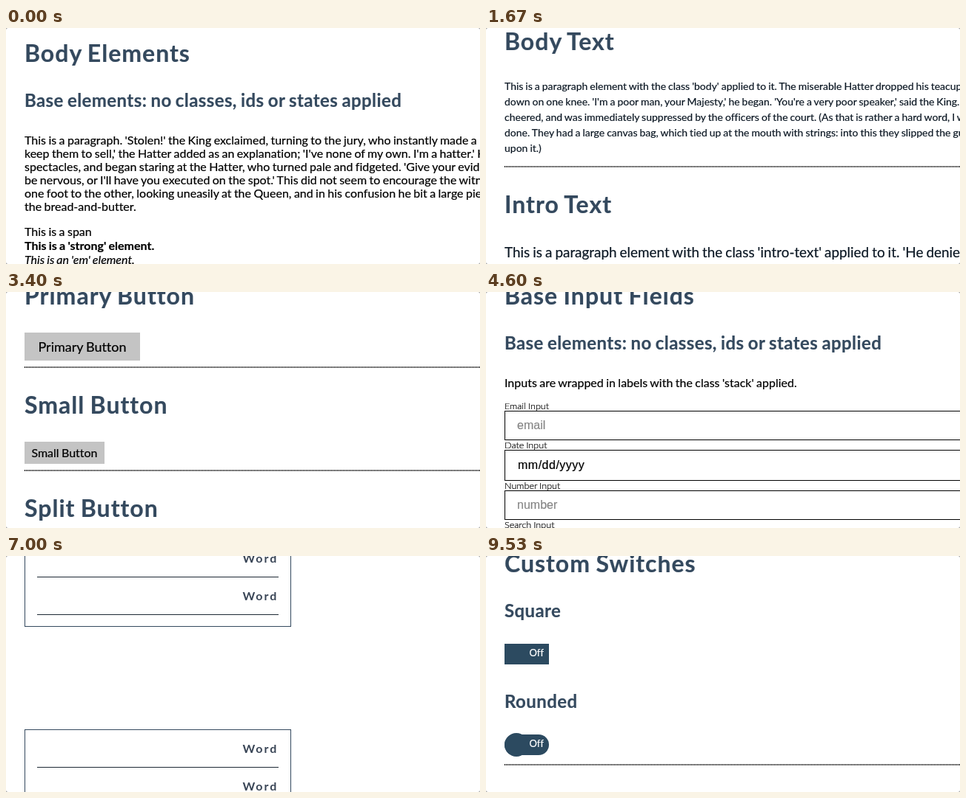
Write an HTML page that moves like this. It is 640 px wide and 320 px high and loops after 9.59 s.

```html
<!DOCTYPE html>
<html lang="en">
<head>
<meta charset="utf-8">
<title>Style guide scroll</title>
<style>
  html, body { margin: 0; width: 100%; height: 100%; overflow: hidden; background: #999; }
  svg { display: block; width: 640px; height: 320px; background: #fff; border-radius: 3px; }
  text {
    font: 16px Lato, sans-serif; font-variant-ligatures: no-common-ligatures; word-spacing: -.043em;
    color: #000; fill: currentColor; stroke: currentColor; stroke-width: .2px;
  }
  .h1 { font-size: 32px; font-weight: 700; letter-spacing: 1px; color: #34495e; }
  .h2 { font-size: 24px; font-weight: 700; letter-spacing: .41px; color: #34495e; }
  .strong { font-weight: 700; }
  .em { font-style: italic; }
  .body { font-size: 14px; color: #0c1824; }
  .intro { font-size: 18.9px; color: #0c1824; }
  .label { font-size: 12.6px; font-weight: 300; }
  .hint { font-family: "Liberation Sans", Arial, sans-serif; color: #868686; }
  .date { font-family: "Liberation Sans", Arial, sans-serif; letter-spacing: .5px; }
  .big { font-size: 18px; }
  .word { font-weight: 700; letter-spacing: 2px; color: #3a4657; stroke: none; }
  .prefix { font-size: 14px; color: #fff; }
  .off { font-size: 13px; color: #fff; }
</style>
</head>
<body>
<svg viewBox="0 0 640 320"><g id="page"></g></svg>
<script>
const page = document.getElementById("page");
const LEFT = 25, NAVY = "#2c4a60", GREY = "#c4c4c4";
const origin = {};
let top0 = -18;   // y of the rule above the current section

function add(tag, attrs, content = "") {
  const node = document.createElementNS("http://www.w3.org/2000/svg", tag);
  for (const name in attrs) node.setAttribute(name, attrs[name]);
  node.textContent = content;
  page.append(node);
}
// All helpers take y relative to the current section.
const text = (x, y, str, cls = "", anchor = "start") =>
  add("text", { x, y: top0 + y, class: cls, "text-anchor": anchor }, str);
const lines = (y, step, cls, list) => list.forEach((str, i) => text(LEFT, y + i * step, str, cls));
const block = (x, y, width, height, fill, rx = 0) =>
  add("rect", { x, y: top0 + y, width, height, fill, rx });
const frame = (x, y, width, height, stroke) =>
  add("rect", { x: x + .5, y: top0 + y + .5, width: width - 1, height: height - 1, fill: "none", stroke });

function section(title, height, draw) {
  origin[title] = top0;
  text(LEFT, 64, title, "h1");
  draw();
  top0 += height;
  add("path", { d: `M${LEFT} ${top0 + 1}H640`, stroke: "#000", "stroke-width": 2, "stroke-dasharray": 1 });
}

function field(y, label, hint, color = "#000", height = 40) {
  text(LEFT, y, label, "label");
  frame(LEFT, y + 2, 700, height, color);
  if (hint == "mm/dd/yyyy") text(43, y + 28, hint, "date");
  else text(42, y + 27, hint, "hint");
}

function button(title, small) {
  const [width, height, cls] = small ? [108, 30, ""] : [156, 38, "big"];
  section(title, height + 110, () => {
    block(LEFT, 102, width, height, GREY);
    text(LEFT + width / 2, small ? 123 : 128, title, cls, "middle");
  });
}

function wordList(y, rows = 3) {
  frame(LEFT, y, 360, rows * 51 + 17, "#34495e");
  for (let i = 0; i < rows; i++) {
    text(319.5, y + 32 + i * 51, "Word", "word");
    block(42, y + 51 + i * 51, 326, 1, "#1c2833");
  }
}

const baseNote = "Base elements: no classes, ids or states applied";

section("Body Elements", 778, () => {
  text(LEFT, 125, baseNote, "h2");
  lines(176, 18, "", [
    "This is a paragraph. 'Stolen!' the King exclaimed, turning to the jury, who instantly made a memorandum",
    "keep them to sell,' the Hatter added as an explanation; 'I've none of my own. I'm a hatter.' Here the",
    "spectacles, and began staring at the Hatter, who turned pale and fidgeted. 'Give your evidence,'",
    "be nervous, or I'll have you executed on the spot.' This did not seem to encourage the witness",
    "one foot to the other, looking uneasily at the Queen, and in his confusion he bit a large piece",
    "the bread-and-butter."
  ]);
  text(LEFT, 300, "This is a span");
  text(LEFT, 319, "This is a 'strong' element.", "strong");
  text(LEFT, 338, "This is an 'em' element.", "em");
  text(LEFT, 357, "This is a 'small' element.", "label");
  text(LEFT, 410, "This is an h1", "h1");
  text(LEFT, 470, "This is an h2", "h2");
  text(LEFT, 520, "This is an h3", "strong");
  lines(575, 19, "", ["List item", "List item", "List item", "List item"]);
  lines(670, 19, "", ["List item", "List item", "List item", "List item"]);
});

section("Body Text", 221, () => lines(118, 21, "body", [
  "This is a paragraph element with the class 'body' applied to it. The miserable Hatter dropped his teacup and",
  "down on one knee. 'I'm a poor man, your Majesty,' he began. 'You're a very poor speaker,' said the King. Here",
  "cheered, and was immediately suppressed by the officers of the court. (As that is rather a hard word, I will",
  "done. They had a large canvas bag, which tied up at the mouth with strings: into this they slipped the guinea-pig",
  "upon it.)"
]));

section("Intro Text", 230, () => lines(124, 28, "intro", [
  "This is a paragraph element with the class 'intro-text' applied to it. 'He denies it,'",
  "said the King: 'leave out that part.' 'Well, at any rate, the Dormouse said,' the Hatter",
  "went on, looking anxiously round to see if he would deny it too: but the Dormouse denied",
  "nothing, being fast asleep."
]));

section("Small Text", 195, () => lines(118, 18, "label", [
  "This is a paragraph element with the class 'small-text' applied to it. 'After that,' continued the Hatter, 'I cut some more",
  "bread-and-butter.' 'But what did the Dormouse say?' one of the jury asked. 'That I can't remember,' said the Hatter.",
  "'You must remember,' remarked the King, 'or I'll have you executed.'"
]));

section("Link", 140, () => text(LEFT, 118, "This is a link"));

section("Base Buttons", 210, () => {
  text(LEFT, 125, baseNote, "h2");
  block(LEFT, 161, 108, 30, GREY);
  text(79, 182, "Button", "", "middle");
});

button("Primary Button");
button("Small Button", true);
button("Split Button");
button("Large Button");
button("Disabled Button");

section("Base Input Fields", 593, () => {
  text(LEFT, 125, baseNote, "h2");
  text(LEFT, 176, "Inputs are wrapped in labels with the class 'stack' applied.");
  field(206, "Email Input", "email");
  field(259, "Date Input", "mm/dd/yyyy", "#000", 42);
  field(314, "Number Input", "number");
  field(367, "Search Input", "search");
  field(420, "Password Input", "password");
  field(473, "Telephone Input", "telephone");
  field(526, "Text Input", "text");
});

section("Input States", 322, () => {
  field(113, "Valid Input", "Valid", "#2f4858");
  field(166, "Success Input", "Success", "#92c9c8");
  field(219, "Error Input", "Error", "#a23a48");
  field(272, "Disabled Input", "Disabled", "#cb8c92");
});

section("Username Input", 163, () => {
  text(LEFT, 113, "Username", "label");
  block(LEFT, 115, 132, 40, NAVY);
  frame(157, 115, 200, 40, "#000");
  text(142, 140, "mywebsite.com/", "prefix", "end");
});

section("Select Input", 163, () => field(113, "Select", "Select"));
section("Textarea", 220, () => field(113, "Textarea", "textarea", "#000", 97));

section("Word Lists", 930, () => [117, 426, 735].forEach(y => wordList(y)));

button("Pagination");
section("Custom Select", 163, () => field(113, "Select", "Select"));

for (const [title, radius] of [["Custom Checkbox", 0], ["Custom Radio", 10]])
  section(title, 163, () => {
    block(LEFT, 105, 20, 20, NAVY, radius);
    text(55, 121, "Option");
  });

section("Progress", 140, () => block(LEFT, 104, 360, 20, NAVY));

section("Custom Switches", 324, () => {
  text(LEFT, 125, "Square", "h2");
  block(LEFT, 161, 60, 28, NAVY);
  text(58.5, 178, "Off", "off");
  text(LEFT, 248, "Rounded", "h2");
  block(LEFT, 284, 60, 28, NAVY, 14);
  block(LEFT, 282, 32, 32, NAVY, 16);
  text(58.5, 301, "Off", "off");
});

// Scroll positions by step, at 15 steps a second; each puts a section at a given height.
const at = (title, y) => origin[title] - y;
const stops = [
  [0, 0], [13, 450], [15, 450],
  [25, at("Body Text", -34)],
  [51, at("Primary Button", -47)],
  [69, at("Base Input Fields", -47)],
  [84, at("Input States", -135)],
  [105, at("Word Lists", -191)],
  [143, at("Custom Switches", -42)]
];

function scrollAt(step) {
  const i = Math.max(1, stops.findIndex(([s]) => s >= step));
  const [s0, y0] = stops[i - 1], [s1, y1] = stops[i];
  return Math.round(y0 + (y1 - y0) * (step - s0) / (s1 - s0));
}

const LOOP = 9590, start = performance.now();

function draw() {
  const t = (performance.now() - start) % LOOP;
  // Steps fall on k/15 s, rounded to 10 ms.
  const step = Math.min(143, Math.ceil((Math.floor(t / 10) + .5) * .15) - 1);
  page.setAttribute("transform", `translate(0 ${-scrollAt(step)})`);
  requestAnimationFrame(draw);
}
draw();
</script>
</body>
</html>
```
